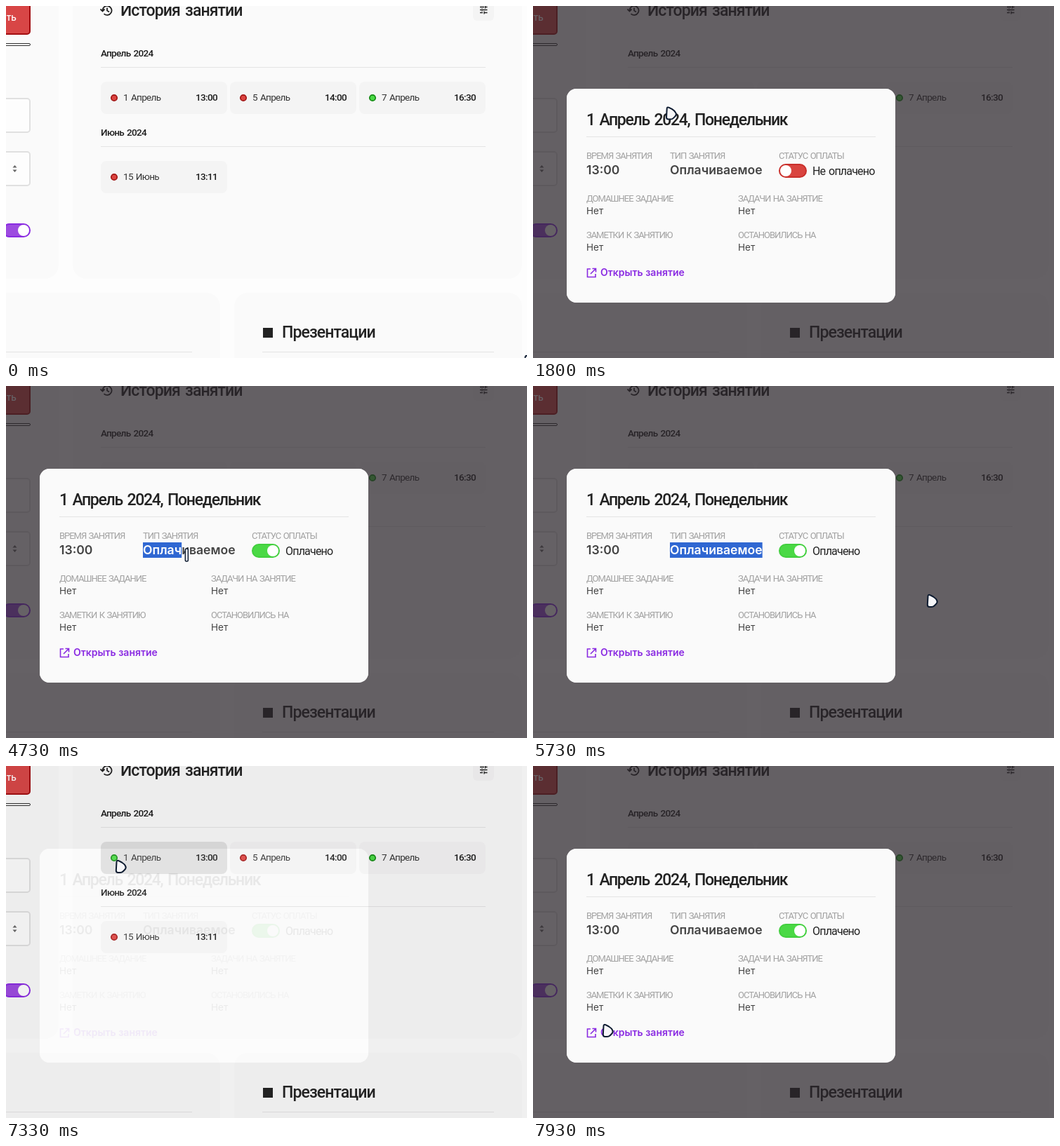
An HTML page that plays this animation: 742x502 px, repeating every 8000 ms.

```html
<!DOCTYPE html>
<html lang="ru">
<head>
<meta charset="utf-8">
<title>История занятий</title>
<style>
  html, body { margin: 0; width: 100%; height: 100%; overflow: hidden; background: #fdfdfd; }
  svg { display: block; width: 742px; height: 502px; }
  text { font: 400 13.5px Roboto, sans-serif; letter-spacing: -.05em; word-spacing: .1em; fill: #333; }
  .head { font-size: 23px; font-weight: 500; letter-spacing: -.04em; fill: #222; }
  .title { letter-spacing: -.057em; }
  .mid { font-weight: 500; fill: #1c1c1c; }
  .label { font-size: 13px; letter-spacing: -.08em; fill: #a2a2a2; }
  .status { font-size: 16px; fill: #222; }
  .wide { font: 400 13.5px Inter, sans-serif; letter-spacing: 0; word-spacing: 0; fill: #444; }
  .value { font-size: 17.6px; font-weight: 600; }
  .link { font-size: 14px; font-weight: 600; fill: #8a2be2; }
  .card { fill: #fafafa; }
  .chip { fill: #f4f4f4; }
  .rule { stroke: #e4e4e4; }
  .field { fill: #fdfdfd; stroke: #e0e0e0; stroke-width: 2; }
  .icon { fill: none; stroke: #222; stroke-width: 1.8; }
  .pointer { fill: #f6f6f8; stroke: #0d1b30; stroke-width: 2; stroke-linejoin: round; }
</style>
</head>
<body>
<svg viewBox="0 0 742 502">
  <rect width="742" height="502" fill="#fdfdfd"/>
  <g id="page">
    <rect class="card" x="-60" y="-60" width="135" height="449" rx="20"/>
    <rect class="card" x="95" y="-60" width="640" height="449" rx="20"/>
    <rect class="card" x="-60" y="409" width="365" height="140" rx="20"/>
    <rect class="card" x="325" y="409" width="410" height="140" rx="20"/>

    <rect x="-30" y="-20" width="64" height="60" rx="4" fill="#d84646" stroke="#a30f12" stroke-width="2"/>
    <text class="wide" x="15" y="21" text-anchor="end" style="fill:#fff;font-weight:500">ть</text>
    <rect x="-20" y="53.5" width="54.500" height="3" rx="1.500" fill="#f2f2f2" stroke="#333"/>
    <rect class="field" x="-20" y="132" width="54" height="48" rx="4"/>
    <rect class="field" x="-20" y="208" width="54" height="48" rx="4"/>
    <path d="M9.500 230.500l3-3.500 3 3.500zM9.500 233.500l3 3.500 3-3.500z" fill="#666"/>
    <rect x="-4" y="311" width="38" height="18" rx="9" fill="#9d4be0" stroke="#8a2be2" stroke-width="2"/>
    <circle cx="25" cy="320" r="8" fill="#fff"/>

    <path class="icon" d="M137.500 6.500a6.500 6.500 0 1 1 2 4.600M134.500 4.500l3 3 3-3M144 2.500v4l3 2"/>
    <text class="head" x="163" y="14">История занятий</text>
    <rect class="chip" x="665" y="-9" width="30" height="30" rx="6"/>
    <path class="icon" style="stroke-width:1.300" d="M675 1.500h6M683 1.500h2.500M682.500-.5v4M675 5.500h2M679 5.500h6.500M678 3.500v4M675 9.500h4M681 9.500h4.500M681 7.500v4"/>
    <text class="mid" x="135" y="72">Апрель 2024</text>
    <path class="rule" d="M135 87.500h548M135 200.500h548M0 493.500h265M365 493.500h330"/>
    <text class="mid" x="135" y="185">Июнь 2024</text>
    <g id="chips"></g>

    <rect x="366" y="459" width="14" height="14" fill="#222"/>
    <text class="head" x="393" y="473">Презентации</text>
  </g>

  <g id="popup">
    <path fill-rule="evenodd" fill="#2c262c" fill-opacity=".72"
      d="M0 0h742v502H0zM62 118h440a14 14 0 0 1 14 14v277a14 14 0 0 1-14 14H62a14 14 0 0 1-14-14V132a14 14 0 0 1 14-14z"/>
    <rect x="48" y="118" width="468" height="305" rx="14" fill="#fafafa"/>
    <text class="head title" x="76" y="170">1 Апрель 2024, Понедельник</text>
    <path class="rule" d="M76 186.500h412"/>
    <g id="labels"></g>
    <text class="wide value" x="76" y="240">13:00</text>
    <rect id="mark" x="195" y="223" height="22" fill="#2f67d2"/>
    <text class="wide value" id="kind" x="195" y="240"><tspan fill="#fff"></tspan><tspan>Оплачиваемое</tspan></text>
    <rect id="track" x="351" y="226" width="38" height="18" rx="9" stroke-width="2"/>
    <circle id="knob" cy="235" r="8" fill="#fff"/>
    <text class="status" id="status" x="398" y="241"></text>
    <path class="icon" style="stroke:#8a2be2;stroke-width:1.600" d="M82 375h-4.500v11.500H89V382M84.500 374.500H89.500v5M89 375l-7 7"/>
    <text class="wide link" x="96" y="385">Открыть занятие</text>
  </g>

  <g id="cursor">
    <path class="pointer" id="arrow" d="M1.500 3Q1.500 0 4.500 1.200L9 3.500Q13 6 14.300 9Q15.500 11.500 13 14L10.500 16.500Q9 18 6.500 18L3.500 18Q.8 18 .8 15z"/>
    <rect class="pointer" id="beam" x="-2" y="-9" width="4" height="18" rx="1.500" style="stroke-width:1.500"/>
  </g>
</svg>
<script>
const LOOP = 8000;
const $ = id => document.getElementById(id);
const clamp = v => Math.max(0, Math.min(1, v));
const ramp = (t, from, len) => clamp((t - from) / len);
const RED = ['#dc4440', '#a01616'], GREEN = ['#4ad945', '#138a13'];

const chip = (x, y, date, time, [fill, edge]) => `
  <rect class="chip" x="${x}" y="${y}" width="180" height="46" rx="8"/>
  <circle cx="${x + 19}" cy="${y + 23}" r="4.200" fill="${fill}" stroke="${edge}" stroke-width="1.700"/>
  <text x="${x + 32}" y="${y + 27}">${date}</text>
  <text class="mid" x="${x + 166}" y="${y + 27}" text-anchor="end">${time}</text>`;

$('chips').innerHTML =
  chip(135, 108, '1 Апрель', '13:00', RED) +
  chip(319, 108, '5 Апрель', '14:00', RED) +
  chip(503, 108, '7 Апрель', '16:30', GREEN) +
  chip(135, 221, '15 Июнь', '13:11', RED);

const label = (x, y, s) => `<text class="label" x="${x}" y="${y}">${s}</text>`;
const note = (x, y, s) => label(x, y, s) + `<text class="wide" x="${x}" y="${y + 18}">Нет</text>`;

$('labels').innerHTML =
  label(76, 218, 'ВРЕМЯ ЗАНЯТИЯ') + label(195, 218, 'ТИП ЗАНЯТИЯ') + label(350, 218, 'СТАТУС ОПЛАТЫ') +
  note(76, 279, 'ДОМАШНЕЕ ЗАДАНИЕ') + note(292, 279, 'ЗАДАЧИ НА ЗАНЯТИЕ') +
  note(76, 331, 'ЗАМЕТКИ К ЗАНЯТИЮ') + note(292, 331, 'ОСТАНОВИЛИСЬ НА');

// Pointer stops: time, x, y
const stops = [
  [0, 738, 498], [470, 738, 498], [820, 400, 310], [1120, 116, 150], [1290, 150, 125],
  [1620, 150, 125], [2050, 280, 200], [2330, 319, 287], [2470, 246, 332], [2670, 246, 332],
  [2930, 373, 248], [3130, 374, 238], [3210, 374, 238], [3470, 440, 263], [3530, 440, 263],
  [3900, 310, 242], [4330, 207, 231], [4500, 194, 232], [4730, 257, 241], [4870, 326, 243],
  [5200, 526, 308], [5330, 548, 304], [5530, 548, 304], [5720, 561, 297], [5930, 561, 297],
  [6360, 311, 146], [6800, 140, 117], [7130, 156, 134], [7340, 156, 134], [7930, 99, 368], [8000, 99, 368]
];

// Velocity at a stop; zero wherever the direction turns or the pointer rests
function slope(i, k) {
  const a = stops[i - 1], b = stops[i], c = stops[i + 1];
  if (!a || !c || (b[k] - a[k]) * (c[k] - b[k]) <= 0) return 0;
  return (c[k] - a[k]) / (c[0] - a[0]);
}

function pointerAt(t) {
  let i = 0;
  while (i < stops.length - 2 && stops[i + 1][0] <= t) i++;
  const a = stops[i], b = stops[i + 1], len = b[0] - a[0];
  const u = (t - a[0]) / len, u2 = u * u, u3 = u2 * u;
  return [1, 2].map(k =>
    a[k] + (b[k] - a[k]) * (3 * u2 - 2 * u3) +
    len * (slope(i, k) * (u3 - 2 * u2 + u) + slope(i + 1, k) * (u3 - u2)));
}

const firstChip = $('chips').querySelector('rect');
const firstDot = $('chips').querySelector('circle');
const [picked, rest] = $('kind').children;
const word = 'Оплачиваемое';
let shown = -1;

function select(n) {
  if (n === shown) return;
  shown = n;
  picked.textContent = word.slice(0, n);
  rest.textContent = word.slice(n);
  $('mark').setAttribute('width', n ? $('kind').getSubStringLength(0, n) : 0);
}

function render(t) {
  const [x, y] = pointerAt(t);
  $('cursor').setAttribute('transform', `translate(${x.toFixed(2)} ${y.toFixed(2)})`);
  const typing = t > 4050 && t < 4900;
  $('arrow').style.display = typing ? 'none' : '';
  $('beam').style.display = typing ? '' : 'none';

  $('popup').style.opacity = ramp(t, 1518, 164) - ramp(t, 5778, 164) + ramp(t, 7318, 164);
  const hover = (t > 1500 && t < 1680) || (t > 7300 && t < 7480);
  firstChip.style.fill = hover ? '#e0e0e0' : '';

  const on = ramp(t, 3170, 180), paid = t >= 3170;
  const [fill, edge] = paid ? GREEN : RED;
  firstDot.setAttribute('fill', fill);
  firstDot.setAttribute('stroke', edge);
  $('knob').setAttribute('cx', 360 + 20 * on * on * (3 - 2 * on));
  $('track').setAttribute('fill', paid ? '#4ad945' : '#d9443f');
  $('track').setAttribute('stroke', paid ? '#42cf3e' : '#c92f2b');
  $('status').textContent = paid ? 'Оплачено' : 'Не оплачено';

  let n = 0;
  if (t > 4500 && t < 5760) n = t > 4870 ? 12 : Math.floor(12 * clamp((x - 195) / 131));
  select(n);
}

const start = performance.now();
function frame() {
  render((performance.now() - start) % LOOP);
  requestAnimationFrame(frame);
}
frame();
</script>
</body>
</html>
```
